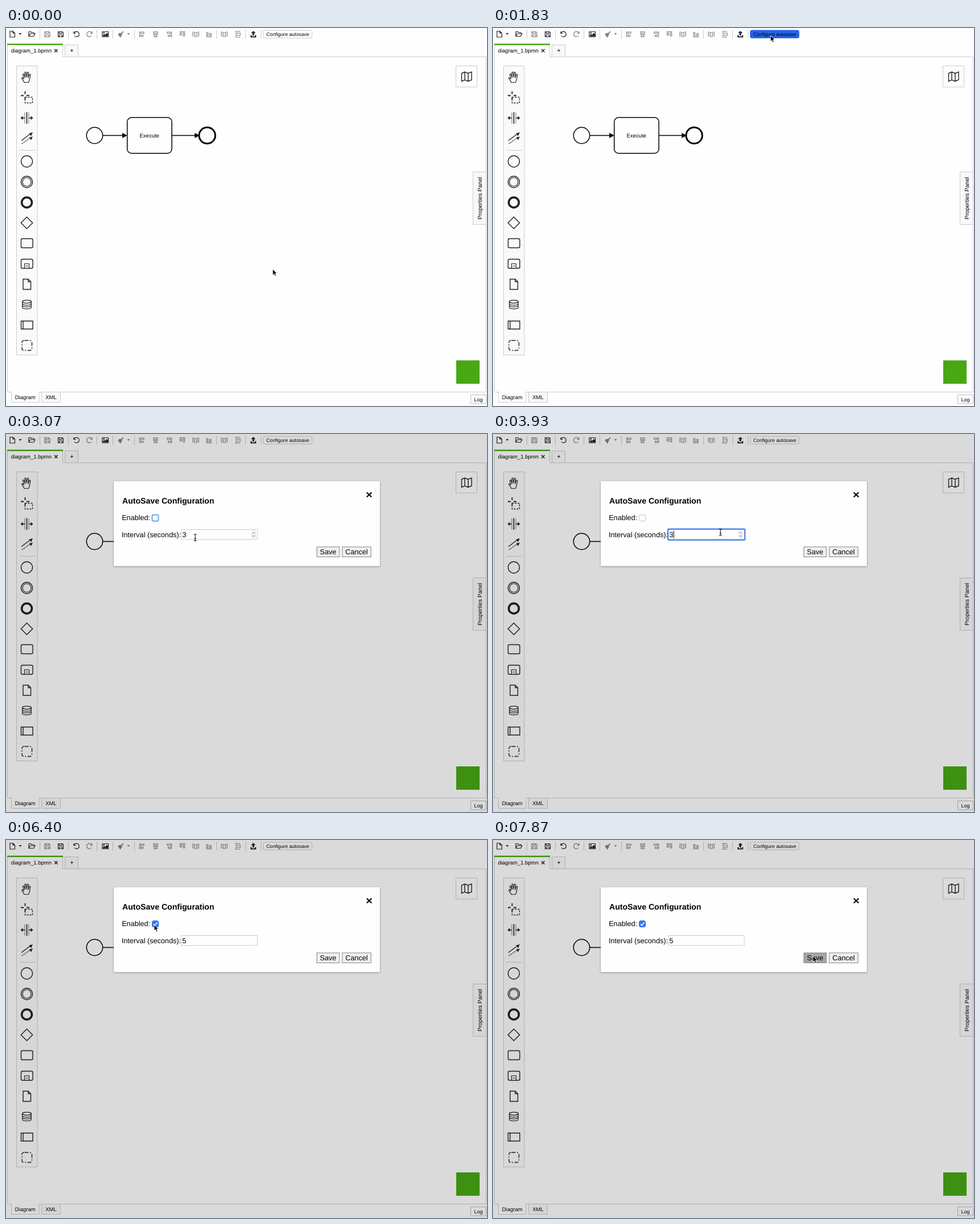
Recreate the animation shown at these times as an HTML page. Size 844 by 663 pixels, loop 8 s.

```html
<!DOCTYPE html>
<html lang="en">
<head>
<meta charset="utf-8">
<title>Autosave settings</title>
<style>
html, body { margin: 0; width: 100%; height: 100%; overflow: hidden; background: #fefefe; }
svg { display: block; width: 100vw; height: 100vh; }
text { font: 9.5px "Liberation Sans", Arial, sans-serif; fill: #000; stroke: none; text-rendering: geometricPrecision; }
.mid { text-anchor: middle; }
.label text { font-size: 12.65px; }
.label .title { font-size: 14.1px; font-weight: bold; }
.icon { fill: none; stroke: #222; stroke-width: 1.2; }
.dim { stroke: #808080; }
.fill { fill: #222; stroke: none; }
.frame { fill: none; stroke: #ccc; }
.soft { fill: #f8f8f8; stroke: #ccc; }
.tool { fill: none; stroke: #222; stroke-width: 1.4; }
.flow { fill: none; stroke: #000; stroke-width: 1.5; }
</style>
</head>
<body>
<svg viewBox="0 0 844 663">
  <defs>
    <filter id="shadow" x="-5%" y="-10%" width="110%" height="125%">
      <feDropShadow dx="0" dy="1" stdDeviation="1.6" flood-opacity=".4"/>
    </filter>
    <g id="bars"><path d="M-4.500-5V5"/><path d="M-2.500-4H3v2.500H-2.500zM-2.500 1.500H1.500V4H-2.500z"/></g>
    <g id="centered"><path d="M-4.500 0H4.500"/><path fill="#fff" d="M-3.500-4.500h7v2.500h-7zM-2.500 2h5v2.500h-5z"/></g>
    <g id="spread"><path d="M-5 4V-4H-3M5 4V-4H3M-2-3h4V4h-4z"/></g>
    <path id="tip" d="M0 0l-9-4.500v9z"/>
  </defs>
  <rect width="844" height="663" fill="#fefefe"/>

  <!-- toolbar -->
  <path class="frame" d="M59.500 3v16M109.500 3v16M159.500 3v16M187.500 3v16M225.500 3v16M369.500 3v16M420.500 3v16M447.500 3v16"/>
  <g class="icon">
    <path d="M7 5.500h5l3.500 3.500v7H7zM12 5.500V9h3.500"/>
    <path d="M40 14.500V6.500h3.500l1.500 1.500h4v2M40 14.500l2.500-4.500H51l-2.500 4.500z"/>
    <path d="M91.500 6.500h7.500l1.500 1.500v7.500h-9zM93.500 6.500V9.500h4.500v-3M93.500 15v-3h5v3"/>
    <path d="M119 6v3.500h3.500M119.500 9a4.600 4.600 0 1 1 .5 4.500"/>
    <path d="M169 6.500h10.500v9H169z"/>
  </g>
  <g class="fill">
    <path d="M22.500 9h5l-2.500 3zM170 14.500v-2l2.500-2 1.500 1.500 3-3.500 2 2.500v3.500z"/>
    <circle cx="171.800" cy="8.800" r="1.200"/>
    <path d="M434 5l4 4h-2.500v4h-3V9H430zM429 12.500h2v2h6v-2h2v4h-10z"/>
  </g>
  <g class="icon dim">
    <path d="M68 6.500h7.500L77 8v7.500h-9zM70 6.500V9.500h4.500v-3M70 15v-3h5v3"/>
    <path d="M151 6v3.500h-3.500M150.500 9a4.600 4.600 0 1 0-.5 4.500"/>
    <path fill="#808080" d="M206 6l-3.500 5-1-1zM197 11l3-2 3 3-2.500 4z"/>
    <path fill="#808080" stroke="none" d="M212.500 9h5l-2.500 3z"/>
    <use href="#bars" x="239" y="11"/>
    <use href="#centered" x="262.500" y="11"/>
    <use href="#bars" transform="translate(286 11) scale(-1 1)"/>
    <use href="#bars" transform="translate(309.500 11) rotate(90)"/>
    <use href="#spread" x="333" y="11"/>
    <use href="#bars" transform="translate(356 11) rotate(-90)"/>
    <use href="#spread" x="383" y="11"/>
    <use href="#spread" transform="translate(407 11) rotate(-90)"/>
  </g>
  <rect id="configure" x="451.500" y="4" width="85.500" height="13.500" rx="2.500"/>
  <text class="mid" x="494.500" y="14" style="font-size:8.700px">Configure autosave</text>

  <!-- tabs and panels -->
  <path class="frame" d="M99.500 30V50.500H842.500V638.500H2.500V30"/>
  <path fill="#48a814" d="M2 27.500h98V30H2z"/>
  <path class="soft" d="M103.500 50.500v-21h23v21z"/>
  <text x="8.700" y="43">diagram_1.bpmn</text>
  <path d="M85 37l5.500 5.500M90.500 37L85 42.500" stroke="#222" stroke-width="1.500"/>
  <path d="M113 39.500h5M115.500 37v5" stroke="#222"/>
  <path fill="#fefefe" stroke="#ccc" d="M9.500 638v18.500h48.500V638"/>
  <path class="soft" d="M62.500 638.500h33v18h-33z"/>
  <text class="mid" x="33.700" y="651">Diagram</text>
  <text class="mid" x="79" y="651">XML</text>
  <path fill="#fefefe" stroke="#bbb" d="M815.500 643.500h27v15.500h-27z"/>
  <text class="mid" x="829" y="655" style="font-size:9px">Log</text>
  <path class="soft" d="M842.500 252.500h-23v92h23z"/>
  <text class="mid" transform="translate(834.500 298.500) rotate(-90)" style="font-size:10.100px">Properties Panel</text>
  <path class="frame" d="M789.500 66.500h37v37h-37z"/>
  <path class="tool" d="M799.500 79.500l5.500-2.500 6 2.500 6-2.500V91l-6 2.500-6-2.500-5.500 2.500zM805 77v14M811 79.500v14"/>
  <rect x="790" y="583" width="41" height="41" fill="#48a814"/>

  <!-- palette -->
  <path fill="#fafafa" stroke="#ccc" d="M18.500 66.500h36.500v507h-36.500zM23 214.500h28"/>
  <g class="tool">
    <path d="M32 95.500c-1-3-3-5-4.500-7.500 1-1.500 2.500-.5 4 1.500l-2-8c1-1.500 2-.5 2.500.5l1.500 5-.5-9c1-1.500 2-1 2.200 0l.8 8.500 1.500-8.500c.7-1 1.800-.7 2 .5l-.7 9 2.200-6c1-1 2-.3 1.800 1-1 5-1 9-3.300 13z" stroke-width="1.200"/>
    <path d="M33.500 111v5M33.500 121v5M26 118.500h5M36 118.500h5" stroke-width="1.800"/>
    <path d="M33.500 121.500h13v10h-13z" stroke-dasharray="3 2"/>
    <path d="M36.500 147.500v20.500" stroke-width="1.600"/>
    <path d="M33 148v19.500M40 148v19.500" stroke-width=".6"/>
    <path d="M27 157.800h6M40 157.800h6"/>
    <path d="M27 197.500l14-10.500"/><path d="M28 203l13-9" stroke-dasharray="2 1.500"/>
    <circle cx="36.500" cy="234" r="10"/>
    <circle cx="36.500" cy="270" r="10"/><circle cx="36.500" cy="270" r="7.500" stroke-width="1.200"/>
    <circle cx="36.500" cy="306" r="8.900" stroke-width="3.600"/>
    <path d="M36.500 331.500l10.200 10.300-10.200 10.300-10.200-10.300z"/>
    <rect x="26.500" y="369.500" width="20.500" height="16" rx="2.500"/>
    <rect x="26.500" y="405.500" width="20.500" height="16" rx="2.500"/>
    <path d="M32.500 421v-7.500h8v7.500M34.500 417.500h4" stroke-width="1.100"/>
    <path d="M30 440.500h9l4.500 4.500v13.500H30zM39 440.500V445h4.500"/>
    <ellipse cx="36.500" cy="480" rx="7.800" ry="2.600"/>
    <path d="M28.700 480v10c0 3.500 15.600 3.500 15.600 0v-10M28.700 483.500c0 3.500 15.600 3.500 15.600 0M28.700 486.500c0 3.500 15.600 3.500 15.600 0" stroke-width="1.200"/>
    <path d="M26.500 514h20.500v14H26.500zM30 514v14"/>
    <rect x="28" y="548" width="17.500" height="17.500" rx="3.500" stroke-dasharray="7 2.500 2 2.500" stroke-dashoffset="-1"/>
  </g>
  <path class="fill" d="M25.500 157.800l4-3.500v7zM47.500 157.800l-4-3.500v7zM47 183l-3 6.500-4-4.500zM47 190.500l-3 6-3.500-4.500z"/>

  <!-- diagram -->
  <g class="flow">
    <circle cx="155.500" cy="188.500" r="14.200"/>
    <path d="M170 188.500h38M291 188.500h44"/>
    <rect x="212.700" y="157" width="78.300" height="62.700" rx="7.500"/>
    <circle cx="353" cy="188.500" r="14.200" stroke-width="3"/>
  </g>
  <use href="#tip" x="213" y="188.500"/><use href="#tip" x="340" y="188.500"/>
  <text class="mid" x="251.700" y="191.500">Execute</text>

  <g id="dialog" class="label">
    <rect width="844" height="663" fill="rgb(5,0,10)" opacity=".14"/>
    <rect x="189" y="83" width="467" height="148.500" fill="#fefefe" filter="url(#shadow)"/>
    <text class="title" x="204" y="122.300">AutoSave Configuration</text>
    <path d="M633 102.500l8.500 8M641.500 102.500l-8.500 8" stroke="#000" stroke-width="2.300"/>
    <text x="203.200" y="150.500">Enabled:</text>
    <rect id="box" x="256.500" y="141.700" width="11" height="11" rx="2.500"/>
    <path id="check" d="M259 147.500l2.300 2.500 4-5.500" fill="none" stroke="#fff" stroke-width="1.500"/>
    <text x="203" y="181">Interval (seconds):</text>
    <rect id="field" fill="#fefefe"/>
    <text id="value" x="309.300" y="181"></text>
    <path id="caret" d="M317.200 169.500v13.500" stroke="#000"/>
    <g id="spinner">
      <rect x="431.500" y="169.500" width="6" height="13" rx="2.500" fill="#fff" stroke="#ccc" stroke-width=".8"/>
      <path id="up" d="M431.500 176v-4q0-2.500 3-2.500t3 2.500v4z" fill="#bbb"/>
      <path d="M432.800 174.500l1.700-2 1.700 2M432.800 178l1.700 2 1.700-2" fill="none" stroke="#444" stroke-width=".9"/>
    </g>
    <rect id="save" x="545.500" y="198" width="39.500" height="17.500" stroke="#858585"/>
    <rect x="590" y="198" width="50.500" height="17.500" fill="#efefef" stroke="#858585"/>
    <text class="mid" x="565.200" y="211.300">Save</text>
    <text class="mid" x="615.200" y="211.300">Cancel</text>
  </g>

  <path id="arrow" d="M0 0V10.500l2.400-2.200 1.700 3.900 1.900-.8-1.700-3.800H7.500z" fill="#000" stroke="#fff" stroke-width=".8"/>
  <path id="beam" d="M-2.500-6q2 0 2.500 1.200Q.5-6 2.500-6M0-5V5M-2.500 6Q-.5 6 0 4.800 .5 6 2.500 6M-1.500 2h3" fill="none" stroke="#111" stroke-width="1.100"/>
</svg>
<script>
const el = id => document.getElementById(id);
const show = (id, on) => el(id).setAttribute('visibility', on ? 'inherit' : 'hidden');
const set = (id, attrs) => { for (const k in attrs) el(id).setAttribute(k, attrs[k]); };

// pointer stops: time, x, y
const path = [
  [0, 468, 423], [170, 468, 423], [600, 463.5, 290], [1000, 470, 138], [1650, 487, 13],
  [2400, 487, 13], [2780, 263, 188], [3070, 332, 181.5], [3640, 332, 181.5], [4080, 423.5, 169],
  [4900, 423.5, 169], [5070, 331, 138], [5220, 331, 138], [5400, 327, 137.5], [5600, 327, 137.5],
  [6220, 260, 148.5], [6640, 260, 148.5], [6850, 320, 125], [7470, 548, 197],
  [7780, 561.5, 203.5], [8000, 561.5, 203.5]
];

const slope = (i, k) => path[i] && path[i + 1]
  ? (path[i + 1][k] - path[i][k]) / (path[i + 1][0] - path[i][0]) : 0;

// monotone tangent: never overshoots, rests at holds
function tangent(i, k) {
  const a = slope(i - 1, k), b = slope(i, k);
  return a * b > 0 ? 2 * a * b / (a + b) : 0;
}

function pointer(t) {
  let i = 0;
  while (i < path.length - 2 && path[i + 1][0] <= t) i++;
  const h = path[i + 1][0] - path[i][0], u = (t - path[i][0]) / h, v = 1 - u;
  return [1, 2].map(k =>
    path[i][k] * v * v * (1 + 2 * u) + path[i + 1][k] * u * u * (1 + 2 * v)
    + h * u * v * (v * tangent(i, k) - u * tangent(i + 1, k)));
}

function draw(t) {
  const within = (a, b) => t >= a && t < b;
  const [x, y] = pointer(t);
  const over = (l, top, r, b) => x >= l && x < r && y >= top && y < b;
  const open = t >= 1900, focused = within(3330, 5230), checked = t >= 6400;
  const hover = over(307, 166, 442, 186);

  const pressed = within(1800, 1900);
  set('configure', { fill: pressed ? '#2463e6' : '#fefefe', stroke: pressed ? '#2463e6' : '#ccc' });
  show('dialog', open);

  const ring = t < 3330;
  set('box', {
    fill: checked ? '#3478f6' : within(6370, 6400) ? '#ddd' : '#fff',
    stroke: checked ? '#3478f6' : ring ? '#72a3ee' : '#c4c4c4',
    'stroke-width': ring ? 2 : 1
  });
  show('check', open && checked);

  set('field', focused
    ? { x: 307, y: 166.7, width: 135, height: 19, rx: 1.5, stroke: '#4a88ee', 'stroke-width': 2.4 }
    : { x: 307.5, y: 167.5, width: 133.5, height: 17.5, rx: 0, stroke: '#ccc', 'stroke-width': 1 });
  el('value').textContent = t < 4200 ? 3 : t < 4430 ? 4 : 5;
  show('caret', within(3400, 4400) || within(4900, 5230));
  show('spinner', open && (focused || hover));
  show('up', within(4170, 4270) || within(4400, 4540));
  set('save', { fill: t >= 7800 ? '#a5a5a5' : '#efefef' });

  const beam = open && (over(307, 166, 418, 186) || over(204, 168, 307, 184)
    || over(204, 139, 253, 153) || over(204, 110, 365, 124));
  show('beam', beam);
  show('arrow', !beam);
  set(beam ? 'beam' : 'arrow', { transform: `translate(${x} ${y})` });
}

function tick() {
  draw(performance.now() % 8000);
  requestAnimationFrame(tick);
}
tick();
</script>
</body>
</html>
```
